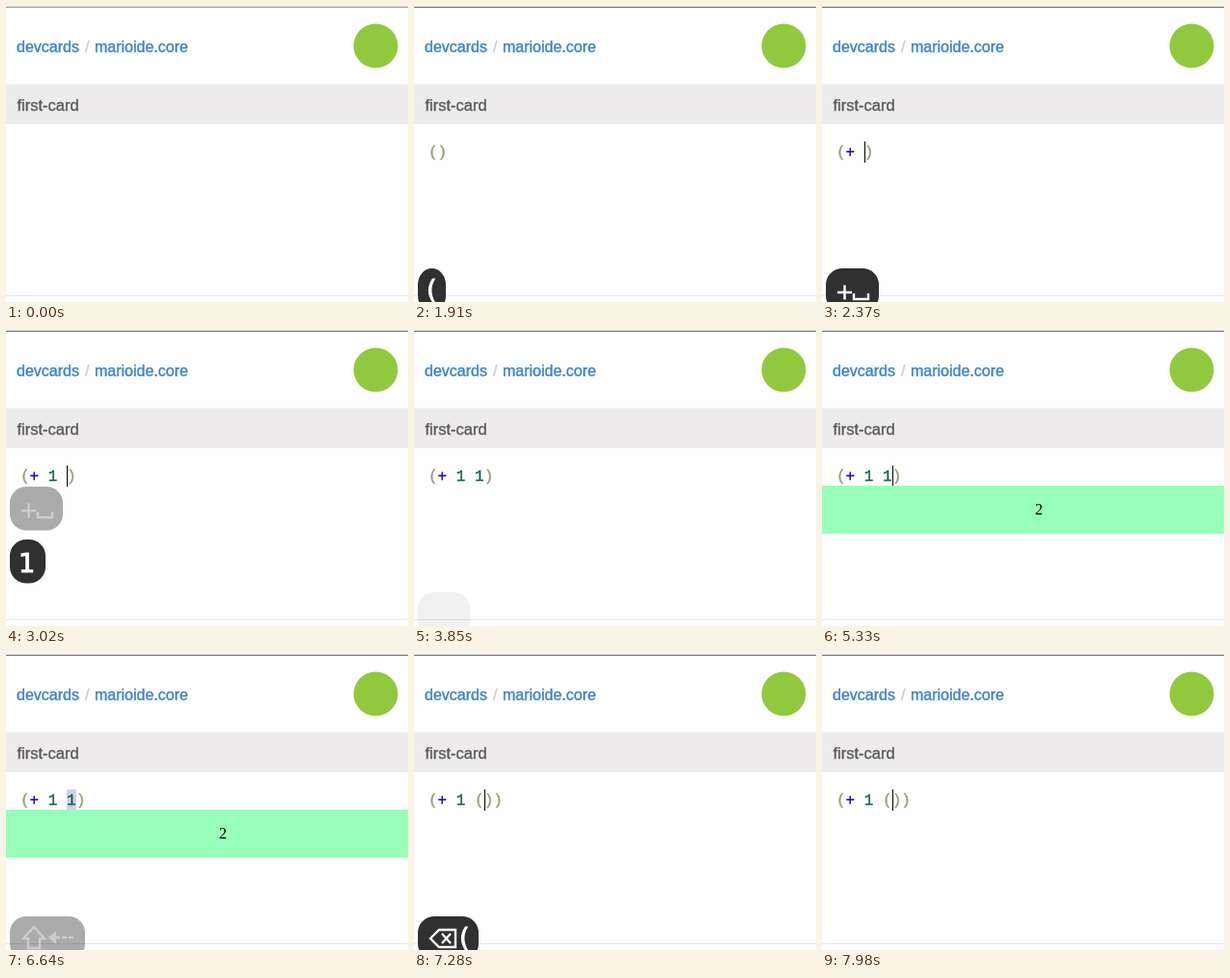
Recreate the animation shown at these times as an HTML page. Size 417x308 px, loop 8000 ms.

```html
<!DOCTYPE html>
<html lang="en">
<head>
<meta charset="utf-8">
<title>Live card</title>
<style>
  html, body { margin: 0; width: 100%; height: 100%; overflow: hidden; background: #fefefe; }
  svg { display: block; width: 417px; height: 308px; }
  text { white-space: pre; }
  .ui { font: 16px "Liberation Sans", Arial, sans-serif; }
  .ui text { stroke-width: .4; }
  .link { fill: #3f83c4; stroke: #3f83c4; }
  .slash { fill: #ccc; stroke: #ccc; }
  .title { font-size: 16.5px; fill: #5c5c5c; stroke: #5c5c5c; }
  #code { font: 16px "Liberation Mono", monospace; stroke-width: .35; }
  .paren { fill: #997; stroke: #997; }
  .num { fill: #164; stroke: #164; }
  .call { fill: #30a; stroke: #30a; }
  #band text { font: 16px "Liberation Serif", serif; }
  .key text { font: 27px "DejaVu Sans", sans-serif; fill: #fff; stroke: #fff; stroke-width: 1; }
  .key path { fill: none; stroke: #fff; stroke-width: 2.4; }
  .key .solid { fill: #fff; stroke: none; }
</style>
</head>
<body>
<svg viewBox="0 0 417 308">
  <rect width="417" height="308" fill="#fefefe"/>
  <rect width="417" height="1" fill="#d6d6d6"/>
  <rect id="edge" y="1" width="417" height="1"/>
  <g class="ui">
    <text class="link" x="11" y="48">devcards</text>
    <text class="slash" x="82" y="48">/</text>
    <text class="link" x="92" y="48">marioide.core</text>
    <circle cx="383.5" cy="41.5" r="23" fill="#91c93e"/>
    <rect y="81.5" width="417" height="41.5" fill="#eeebec"/>
    <text class="title" x="11.5" y="109">first-card</text>
  </g>
  <rect y="301" width="417" height="1" fill="#e6e6e6"/>
  <rect id="pick" x="63" y="141" width="10" height="21" fill="#d0d0ec"/>
  <text id="code" x="15" y="157"></text>
  <rect id="caret" y="141" width="1" height="22"/>
  <g id="band">
    <rect y="162" width="417" height="50" fill="#98ffba"/>
    <text x="221" y="192">2</text>
  </g>
  <g id="keys"></g>
</svg>
<script>
const LOOP = 8000, BLINK = 530, CHAR = 9.6, LEFT = 15;
const $ = id => document.getElementById(id);

// time, text, caret index
const edits = [
  [0, "", -1],
  [780, "", 0],
  [1380, "()", 1],
  [2140, "(+)", 2],
  [2370, "(+ )", 3],
  [2850, "(+ 1)", 4],
  [3020, "(+ 1 )", 5],
  [3140, "(+ 1 1)", 6],
  [4270, "(+ 1 1)", 6],
  [5980, "(+ 1 1)", -1],
  [6750, "(+ 1 )", 5],
  [6980, "(+ 1 ())", 6],
  [7980, "(+ 1 ())", 6]
];

const label = (s, x, y = 34) => `<text x="${x}" y="${y}">${s}</text>`;
const path = (d, extra = "") => `<path d="${d}" ${extra}/>`;
const space = x => path(`M${x} 26v6h15v-6`);
const plus = path("M12 25h15M19.5 17.5v15");
const shift = path("M25 11L36 23H31V33H19V23H14Z");
const left = path("M40 22l8-7v14z", 'class="solid"') +
  path("M47 22H66", 'stroke-dasharray="5 2"');
const erase = path("M13 23L22 14H39V32H22ZM25 18l9 10M34 18l-9 10");
const command = path("M20 18h10v10h-10zM20 18h-3a3 3 0 1 1 3-3zM30 18v-3a3 3 0 1 1 3 3z" +
  "M20 28v3a3 3 0 1 1-3-3zM30 28h3a3 3 0 1 1-3 3z");
const enter = path("M46 25H59V15M51 19l-6 6 6 6");

// each bubble: its successive [time, width, glyphs]
const bubbles = [
  [[1380, 29, label("(", 9, 31)]],
  [[2140, 36, plus], [2370, 55, plus + space(29)]],
  [[2850, 37, label("1", 9)]],
  [[3020, 0, ""], [3080, 38, space(12)], [3140, 54, space(12) + label("1", 28)]],
  [[4210, 72, command + enter]],
  [[5980, 78, shift + left]],
  [[6750, 50, erase], [6980, 63, erase + label("(", 43, 31)]]
];

const last = (list, t) => list.filter(e => e[0] <= t).pop();

function fade(born, t) {
  const age = t - born;
  if (age < 590) return 1;
  // this bubble lingers as a faint trace until the next key
  if (born === 3140 && age >= 710) return t < 4210 ? .06 : 0;
  return [.75, .4, .06][Math.floor((age - 590) / 60)] || 0;
}

function drawKeys(t) {
  const live = bubbles.map(b => last(b, t)).filter(k => k && fade(k[0], t) > 0);
  return live.map(([born, w, glyphs], i) => {
    if (!w) return "";
    const a = fade(born, t), y = 273 - 55 * (live.length - 1 - i);
    return `<g class="key" transform="translate(4 ${y})" opacity="${a}">` +
      `<rect width="${w}" height="45.5" rx="17" fill="#303030"/><g opacity="${a}">${glyphs}</g></g>`;
  }).join("");
}

const span = (name, s) => `<tspan class="${name}">${s}</tspan>`;
const paint = s => s.replace(/./g, c =>
  /\d/.test(c) ? span("num", c) : /[()]/.test(c) ? span("paren", c) :
  c === "+" ? span("call", c) : c);

const cache = {};
function fill(id, html) {
  if (cache[id] !== html) $(id).innerHTML = cache[id] = html;
}
function show(id, on) {
  $(id).style.display = on ? "" : "none";
}

function render(t) {
  const [since, text, at] = last(edits, t);
  fill("code", paint(text));
  fill("keys", drawKeys(t));
  $("edge").setAttribute("fill", t < 780 ? "#aaa" : "#7a7a7a");
  $("caret").setAttribute("x", Math.round(LEFT + CHAR * Math.max(at, 0)));
  show("caret", at >= 0 && Math.floor((t - since) / BLINK) % 2 === 0);
  show("pick", t >= 5980 && t < 6750);
  show("band", t >= 4320 && t < 7280);
}

const start = performance.now();
function tick() {
  render((performance.now() - start) % LOOP);
  requestAnimationFrame(tick);
}
tick();
</script>
</body>
</html>
```
